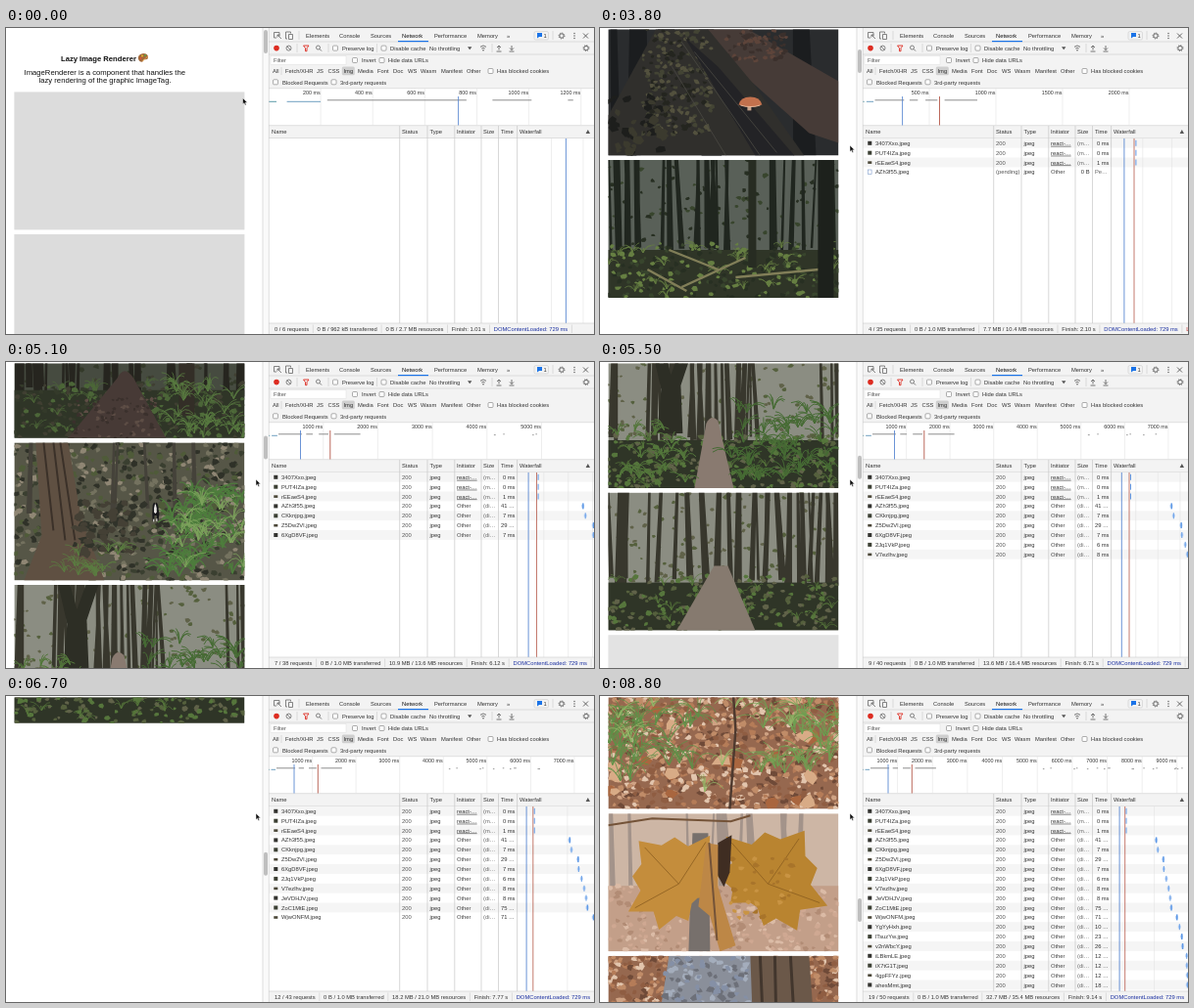
An HTML page for the animation above (8900 ms loop, 600 by 313 pixels).

```html
<!DOCTYPE html>
<html lang="en">
<head>
<meta charset="utf-8">
<title>Lazy Image Renderer</title>
<style>
html, body { margin: 0; width: 100%; height: 100%; overflow: hidden; background: #fff; }
svg { display: block; width: 100vw; height: 100vh; font: 5.8px "Liberation Sans", Arial, sans-serif; fill: #333; }
text { white-space: pre; }
</style>
</head>
<body>
<svg id="stage" viewBox="0 0 600 313" preserveAspectRatio="none"></svg>
<script>
const LOOP = 8900, STEP = 100, PITCH = 145.6, IW = 235, IH = 141;
const DCL = 0.729, LOAD = 1.41;

// name, ms taken, start on the network clock, moment the row appears
const rows = `3407Xxo 0 1.5 .4
PUT4IZa 0 1.5 .4
rEEaeS4 1 1.5 .4
AZh3f55 41 5.16 3.65
CKknjpg 7 5.37 4.1
Z5Dw2Vl 29 6.04 4.7
6XgD8VF 7 6.113 4.8
2Jq1VkP 6 6.42 5.2
V7ezlhv 8 6.7 5.5
JeVDHJV 8 6.9 5.8
ZoC1MtE 75 7.015 5.95
WjwONFM 71 7.7 6.45
YgYyHxh 10 8.03 6.9
lTsuzYw 23 8.3 7.65
v2nWbcY 26 8.4 7.7
iLBkmLE 12 8.92 7.9
iX7tG1T 12 8.95 7.95
4gpFFYz 12 9 8
ahesMmt 18 9.122 8.05`.split('\n').map(line => {
  const [name, ms, start, at] = line.split(' ');
  return { name: name + '.jpeg', ms: +ms, start: +start, at: +at, end: +start + ms / 1000 };
});
const scrollKeys = [[2.75, 0], [3.8, 221.6], [5.1, 711], [6, 1251], [7.5, 2385], [8.8, 2420.4]];
// the scrollbar runs a little ahead of the painted page
const thumbKeys = [[2.75, 2], [3.8, 22], [5.1, 75.5], [6, 121], [7.5, 204], [8.8, 207]];
const sizeKeys = [[0, 0], [3, 7.7], [4, 7.7], [7, 10.9], [11, 16.34], [13, 20.1], [19, 32.7]];

const clamp = (v, a, b) => Math.min(b, Math.max(a, v));
function along(keys, x) {
  if (x <= keys[0][0]) return keys[0][1];
  for (let i = 1; i < keys.length; i++) {
    const [x0, y0] = keys[i - 1], [x1, y1] = keys[i];
    if (x <= x1) return y0 + (y1 - y0) * (x - x0) / (x1 - x0);
  }
  return keys[keys.length - 1][1];
}

// drawing helpers
const n1 = v => v.toFixed(1);
const rect = (x, y, w, h, fill, more = '') => `<rect x="${x}" y="${y}" width="${w}" height="${h}" fill="${fill}" ${more}/>`;
const path = (d, fill, more = '') => `<path d="${d}" fill="${fill}" ${more}/>`;
const line = (d, stroke, w = 0.6, more = '') => path(d, 'none', `stroke="${stroke}" stroke-width="${w}" ${more}`);
const text = (x, y, s, more = '') => `<text x="${x}" y="${y}" ${more}>${s}</text>`;
const vline = (x, y0, y1, col, w) => line(`M${n1(x)} ${y0}V${y1}`, col, w);
const oval = (x, y, rx, ry, fill) => `<ellipse cx="${x}" cy="${y}" rx="${rx}" ry="${ry}" fill="${fill}"/>`;

// photo stand-ins
let seed = 1;
const rnd = (a, b) => a + (b - a) * (seed = seed * 16807 % 2147483647) / 2147483647;
const fillAll = c => rect(0, 0, IW, IH, c);

function blobs(n, [x, y, w, h], r, cols) {
  return cols.split(' ').map(c => {
    let d = '';
    for (let i = 0; i < n; i++) {
      const cx = rnd(x, x + w), cy = rnd(y, y + h), s = rnd(r * 0.5, r), turn = rnd(0, 6);
      for (let k = 0; k < 6; k++) {
        const a = turn + k * 1.047, q = s * rnd(0.5, 1.2);
        d += (k ? 'L' : 'M') + n1(cx + q * Math.cos(a)) + ' ' + n1(cy + q * Math.sin(a) * 0.8);
      }
      d += 'Z';
    }
    return path(d, c);
  }).join('');
}
function fronds(n, [x, y, w, h], len, col, sw = 0.8) {
  let d = '';
  for (let i = 0; i < n; i++) {
    const cx = rnd(x, x + w), cy = rnd(y, y + h);
    for (let k = 0; k < 6; k++) {
      const dx = rnd(-len, len);
      d += `M${n1(cx)} ${n1(cy)}q${n1(dx * 0.4)} ${n1(-len * 0.7)} ${n1(dx)} ${n1(-rnd(0.1, 0.8) * len)}`;
    }
  }
  return line(d, col, sw);
}
function trunks(n, col, wMax, base) {
  let d = '';
  for (let i = 0; i < n; i++) {
    const x = rnd(0, IW), w = rnd(wMax * 0.3, wMax), lean = rnd(-5, 5);
    d += `M${n1(x + lean)} 0h${n1(w * 0.7)}L${n1(x + w)} ${n1(base + rnd(-8, 12))}h${n1(-w)}Z`;
  }
  return path(d, col);
}
function maple(x, y, r, turn, col) {
  const half = [1, 0.72, 0.8, 0.66, 0.98, 0.64, 0.85, 0.55, 0.65, 0.4];
  const all = half.concat(half.slice(1).reverse());
  const at = (q, i) => {
    const a = turn + i * Math.PI * 2 / all.length;
    return n1(x + r * q * Math.sin(a)) + ' ' + n1(y - r * q * Math.cos(a));
  };
  return path('M' + all.map(at).join('L') + 'Z', col) +
    line([0, 4, 15].map(i => `M${x} ${y}L${at(0.85, i)}`).join(''), '#8b5d20', 0.8);
}
const all = [0, 0, IW, IH], low = [0, 85, IW, 56];
const woods = (sky, bark, leaf, fern) => fillAll(sky) + blobs(60, [0, 0, IW, 90], 3.5, leaf) + trunks(30, bark, 8, 95) +
  rect(0, 92, IW, 49, '#2f3527') + blobs(80, low, 4, leaf + ' ' + fern) + fronds(26, low, 12, fern, 0.7);
const litter = () => fillAll('#96684f') + blobs(190, all, 4.5, '#cfa283 #b57c58 #6f4a38 #e2c5ad #c08c68 #8f5d42');
const dog = (x, y, s) => `<g transform="translate(${x} ${y}) scale(${s})">` +
  path('M-6 -18l3 -6 3 3 3 -3 3 6 1 8 2 12 -2 16h-3l-1 -12h-5l-1 13h-3l-1 -16z', '#17171a') +
  path('M-1 -20h2l2 9v9l-3 4 -3 -4v-9z', '#e8e6e3') + rect(-5, 14, 2.5, 6, '#e8e6e3') + rect(2, 13, 2.5, 6, '#e8e6e3') + '</g>';

const mainWoods = () => woods('#596058', '#20261f', '#38452d #272f22', '#667f42');
const ferny = () => woods('#8b8d82', '#38372d', '#55603d #606249', '#56763c');
const leafPath = () => litter() + path('M90 0H125L135 141H80Z', '#766b62');
const scenes = [
  () => fillAll('#2b2d31') + blobs(120, all, 7, '#6e7080 #4a4c58 #1e2023 #868798') +
    blobs(55, [5, 5, 110, 85], 7, '#935d45 #74483a') + blobs(25, [125, 0, 85, 60], 5, '#7c5546') +
    blobs(25, [0, 0, 45, 30], 6, '#3f5f36') + blobs(25, [180, 0, 55, 35], 8, '#345a2e') +
    blobs(25, [185, 85, 50, 50], 8, '#3c6a34') + blobs(22, [0, 95, 40, 46], 8, '#39612f') +
    oval(120, 70, 33, 32, '#4d7c33') + blobs(50, [95, 45, 50, 50], 7, '#6f9f45 #578a38 #3e6b2b') +
    line('M160 84L235 92M180 86l25 -14M190 88l30 18M155 92l45 32M205 89l22 -18', '#c3c4d0', 0.9),
  () => fillAll('#2a2c2e') + trunks(7, '#1b1d1f', 24, 141) +
    path('M95 5L122 0 235 65V128L205 118 140 60Z', '#463b37') + blobs(35, [120, 12, 65, 32], 4, '#5d443a #3b302c') +
    path('M55 0H92L150 70 200 141H0V100Z', '#302f2c') + blobs(75, [35, 10, 70, 110], 4, '#434434 #24251f #53513e') +
    path('M78 20L112 50 190 141H150Z', '#232326') + line('M75 25L155 141M88 35L172 138M65 50L120 141', '#4b4a43', 0.8) +
    blobs(22, [0, 80, 60, 60], 7, '#1d1e1c #3b3a2e') + rect(142, 88, 4, 7, '#c9a48c') +
    path('M133 89q2 -8 12 -8t12 8q-12 4 -24 0z', '#c2714d') + path('M135 89q10 3 20 0v1q-10 3 -20 0z', '#e8b798'),
  () => mainWoods() + line('M62 92L112 112M75 130L140 100M130 120l85 -8M40 112l40 22', '#817e58', 2.4) +
    rect(214, 0, 16, 141, '#1d211c') + rect(143, 0, 8, 110, '#272c22'),
  () => mainWoods() + path('M80 141L112 88h16L150 141Z', '#5c5146'),
  () => woods('#464b40', '#26251f', '#343a2a #403f32', '#4c6638') + path('M55 141L105 80Q112 65 122 80L155 141Z', '#473a36') +
    blobs(45, [60, 100, 85, 41], 3, '#5d4d45 #3a302c') + rect(168, 0, 16, 118, '#332e27') + fronds(28, [160, 85, 75, 56], 18, '#587a40'),
  () => fillAll('#565647') + blobs(140, all, 4.5, '#74725f #3a3f30 #4f5b39 #8f8674 #2f3128') + trunks(6, '#45423a', 6, 70) +
    path('M22 0H55L68 75 92 141H10L28 95Z', '#5f5042') + line('M30 0L40 90M40 0L52 100M47 0L62 100', '#3b3129', 2) +
    blobs(50, [60, 60, 75, 55], 6, '#31332a #444035') + fronds(40, [150, 55, 85, 85], 26, '#4d7c3c', 1.1) +
    fronds(20, [165, 60, 70, 70], 22, '#7da35c') + fronds(14, [45, 110, 70, 30], 16, '#5b7d40') + dog(144, 72, 0.45),
  () => ferny() + path('M45 0H57L64 25 73 0H86L74 36 76 85H50L54 40Z', '#2d2e25') +
    path('M88 141L100 75Q105 65 112 72L128 141Z', '#897a70') + fronds(45, [125, 60, 110, 80], 20, '#466b34', 1) + fronds(22, [0, 80, 80, 55], 16, '#53763b', 1),
  () => ferny() + path('M70 141L108 75h14L150 141Z', '#867a6f'),
  () => fillAll('#4b4540') + blobs(55, [0, 0, IW, 45], 5, '#a9a78d #6d6f50 #8b8a78') + trunks(12, '#37332c', 6, 38) +
    path('M0 80L60 45H180L235 90V141H0Z', '#48423f') + blobs(90, [0, 50, IW, 91], 4, '#37322f #5f5751 #2c2927') +
    fronds(30, [0, 100, 60, 40], 12, '#596945') + fronds(25, [190, 75, 45, 66], 12, '#626f47') +
    path('M190 0H215L213 80H196Z', '#29241f') + rect(112, 0, 16, 52, '#342d26') + dog(155, 84, 1),
  ferny,
  () => woods('#8f9082', '#3c392f', '#65623f #6a6347', '#627541'),
  ferny,
  () => litter() + trunks(5, '#5c5048', 14, 80),
  () => litter() + fronds(18, all, 20, '#6f8c46'),
  leafPath,
  () => litter() + trunks(4, '#66594f', 12, 70),
  () => litter() + blobs(14, all, 11, '#a9663f #d8ab86') + fronds(30, [0, 40, 95, 75], 32, '#5f9148') +
    fronds(24, [155, 35, 80, 70], 32, '#6fa052') + fronds(12, all, 24, '#93b768') + line('M126 0L130 60 124 141', '#4f3a2f', 2.5),
  () => fillAll('#cdb6a5') + trunks(12, '#a3938a', 9, 75) + rect(0, 74, IW, 67, '#c39f89') + blobs(90, [0, 74, IW, 67], 4, '#dbbba6 #b28c75 #cfa892') +
    path('M86 20H102L104 141H82Z', '#77706c') + maple(72, 72, 60, -0.75, '#c48d3c') + maple(163, 72, 66, 0.6, '#b98430') +
    blobs(16, [125, 45, 65, 65], 4, '#a8742a #c99443') + path('M112 30L126 22 124 60 118 75 110 60Z', '#3f2d22') +
    path('M100 30L112 32 112 75 130 135 114 141 104 105 92 95Z', '#bd8746') +
    line('M103 30L111 130M0 12L45 5 125 8 145 2', '#745338', 2),
  () => litter() + path('M62 0H150L155 141H40Z', '#8a8f9a') + blobs(90, [58, 0, 85, 141], 5, '#a4adbc #6d7079 #8590a6') +
    path('M145 0H205L215 141H150Z', '#6b5849') + line('M155 0l6 141M170 0l3 141M186 0l8 141', '#42362d', 3)
];

// static browser chrome
const box = (x, y) => rect(x - 2.5, y - 2.5, 5, 5, '#fff', 'rx="1" stroke="#777" stroke-width=".6"');
const words = (y, list) => list.split('|').map(s => { const i = s.indexOf(' '); return text(s.slice(0, i), y, s.slice(i + 1)); }).join('');
const sep = (x, y0, y1) => vline(x, y0, y1, '#ccc', 0.6);
const gear = (x, y) => `<circle cx="${x}" cy="${y}" r="2.2" fill="none" stroke="#666" stroke-width="1"/>` +
  `<circle cx="${x}" cy="${y}" r="3" fill="none" stroke="#666" stroke-width=".9" stroke-dasharray="1.1 1.26"/>`;
const arrow = (x, up) => line(`M${x} 22.5v-4.5m-2 ${up ? 2 : 2.5}l2 ${up ? -2 : 2} 2 ${up ? 2 : -2}M${x - 2.5} 24h5`, '#555', 0.8);

function chrome() {
  let s = rect(268, 0, 332, 62, '#f3f3f3') + rect(268, 61.5, 332, 38, '#fff') + rect(268, 99.5, 332, 213.5, '#fff') +
    rect(268, 99.8, 332, 12.6, '#f3f3f3');
  for (const y of [14, 27, 61.7, 99.7, 112.5]) s += line(`M268 ${y}H600`, '#ccc');
  s += line('M279 8.5v-4h-5.5v5.5h2.5M277 7l4 4m-4 -1.5v-2.5h2.5', '#666', 0.8) +
    line('M287 11h-1.5v-7h5v1.5M288.5 6.5h4v5h-4z', '#666', 0.8) + sep(299, 3, 12) +
    words(10, '306 Elements|340 Console|372 Sources|437 Performance|481 Memory|511 »') +
    text(404, 10, 'Network', 'fill="#111"') + rect(400, 13, 31, 1.2, '#1a73e8') +
    path('M542 5h5v4h-3l-2 1.6z', '#1a73e8') + text(548.5, 10, '1') + rect(539, 3.6, 14.5, 8.4, 'none', 'rx="1.5" stroke="#ccc" stroke-width=".6"') +
    sep(558, 3, 12) + gear(567, 8) + [5.5, 8, 10.5].map(y => oval(580, y, 0.7, 0.7, '#555')).join('') + line('M589 5.5l5 5m0 -5l-5 5', '#555', 0.9);
  s += oval(276, 20.6, 2.8, 2.8, '#dd2c21') + '<circle cx="288.5" cy="20.6" r="2.5" fill="none" stroke="#666" stroke-width=".8"/>' +
    line('M286.8 18.9l3.4 3.4', '#666', 0.8) + sep(297, 16, 25) + line('M303.5 18h5.5l-2 2.7v3h-1.5v-3z', '#dd2c21', 0.9) +
    '<circle cx="318.5" cy="20" r="2" fill="none" stroke="#666" stroke-width=".8"/>' + line('M320 21.5l2 2', '#666', 0.9) + sep(329, 16, 25) +
    box(336, 20.6) + box(385.5, 20.6) + words(22.6, '343 Preserve log|392 Disable cache|432 No throttling') + sep(378.5, 16, 25) +
    path('M471 19.3h4.4l-2.2 3z', '#555') + line('M484 19.3q3 -2.6 6 0M485.3 21q1.7 -1.4 3.4 0', '#555', 0.8) + oval(487, 22.8, 0.8, 0.8, '#555') +
    sep(496, 16, 25) + arrow(503, true) + arrow(516, false) + gear(592, 20.6);
  s += rect(270, 28.6, 77, 9, '#fff', 'stroke="#ddd" stroke-width=".5"') + text(273, 35.3, 'Filter', 'fill="#555"') + box(356, 33) + box(383.5, 33) +
    words(35.2, '363 Invert|390 Hide data URLs') + rect(342.8, 39.6, 13, 8.6, '#cfcfcf', 'rx="1.5"') + sep(281, 40, 48) +
    words(46.2, '272 All|285 Fetch/XHR|317 JS|328.5 CSS|344.5 Img|359 Media|379 Font|395 Doc|410 WS|423 Wasm|444 Manifest|470 Other|501 Has blocked cookies') +
    box(494.5, 44) + box(275, 55.3) + box(334.5, 55.3) + words(57.5, '282 Blocked Requests|341 3rd-party requests') +
    words(108.3, '271 Name|404 Status|432.5 Type|460 Initiator|487 Size|505 Time|524 Waterfall') + path('M591.6 108h4.4l-2.2 -4z', '#555');
  return s;
}
const palette = path('M135 32q-1 -5 5 -6 5 0 5 4 0 3 -4 2 -1 0 -1 2 -3 2 -5 -2z', '#a3693a') +
  oval(137.5, 31, 0.9, 0.9, '#e34d3c') + oval(139, 28.5, 0.9, 0.9, '#f2c230') + oval(142, 28, 0.9, 0.9, '#58a846') + line('M139 34l6 -5', '#d99c4e', 1);

const $ = id => document.getElementById(id);
$('stage').innerHTML = `<defs><clipPath id="page"><rect y="1.5" width="262" height="312"/></clipPath>
<clipPath id="photo"><rect width="${IW}" height="${IH}"/></clipPath></defs>` +
  rect(0, 0, 600, 313, '#fff') + '<g clip-path="url(#page)"><g id="scroll" fill="#111">' +
  text(56, 33.5, 'Lazy Image Renderer', 'font-size="7.65" font-weight="700"') + palette +
  text(18.5, 47.8, 'ImageRenderer is a component that handles the', 'font-size="7.7"') +
  text(33.5, 55.8, 'lazy rendering of the graphic ImageTag.', 'font-size="7.7"') +
  scenes.map((draw, i) => {
    seed = 977 + i * 613;
    return `<g transform="translate(8.4 ${n1(65.4 + i * PITCH)})">${rect(0, 0, IW, IH, '#dcdcdc', `id="hold${i}"`)}` +
      `<g id="img${i}" clip-path="url(#photo)">${draw()}</g></g>`;
  }).join('') + '</g></g>' +
  rect(261.8, 0, 6.2, 313, '#fafafa') + sep(262, 0, 313) + rect(263, 0, 4, 24, '#bfbfbf', 'id="thumb" rx="2"') +
  chrome() + '<g id="over"></g><g id="table"></g><g id="foot"></g>' + sep(268.3, 0, 313) +
  '<path id="cursor" d="M0 0v6.6l1.5 -1.4 1 2.4 1.2 -.5 -1 -2.3h2.1z" fill="#111" stroke="#fff" stroke-width=".5"/>';

const BLUE = '#5b88d2', RED = '#b5584a';
const niceStep = (scale, min, list) => list.find(v => v * scale >= min) || list[list.length - 1];
// the overview widens by a quarter whenever it runs out of room
const overviewScale = end => 332 / Math.pow(1.25, Math.ceil(Math.log(end) / Math.log(1.25) - 1e-6));

function overview(end, labelEnd) {
  const k = overviewScale(end), X = v => 268 + v * k;
  const labelK = overviewScale(labelEnd), step = niceStep(labelK, 35, [0.1, 0.2, 0.5, 1]);
  let s = '';
  for (let i = 1, x; (x = 268 + i * step * labelK) < 600; i++)
    s += vline(x, 62, 99.5, '#e2e2e2', 0.6) + text(n1(x - 0.5), 67.6, Math.round(i * step * 1000) + ' ms', 'text-anchor="end" font-size="5.4"');
  for (const [a, b, y, col] of [[0, 0.03, 75.3, '#5b9aa8'], [0.07, 0.2, 75.3, '#6f9fc0'], [0.225, 0.76, 73.8, '#8d8d8d'],
    [0.86, 1.01, 73.8, '#8d8d8d'], [1.15, 1.37, 73.8, '#8d8d8d'], [1.5, 2.1, 73.8, '#8d8d8d']])
    if (a < end) s += line(`M${n1(X(a))} ${y}H${n1(X(Math.min(b, end)))}`, col, 1);
  rows.slice(3).forEach((r, i) => {
    if (r.end <= end + 0.001) s += line(`M${n1(X(r.start))} ${i % 2 ? 73.8 : 74.6}h${n1(Math.max(1.5, r.ms / 1000 * k))}`, '#8d8d8d', 0.9);
  });
  s += vline(X(DCL), 70, 99.5, BLUE, 0.9);
  return end > LOAD ? s + vline(X(LOAD), 70, 99.5, RED, 0.9) : s;
}

const waiting = (r, t) => r === rows[3] && t < r.start - 1.25;

function table(t, shown, end) {
  const k = 76 / end, X = v => 524 + v * k, step = niceStep(k, 20, [0.2, 0.5, 1, 2, 5]);
  let s = '', bars = '';
  shown.forEach((r, i) => {
    const y = 112.8 + i * 9.87, b = n1(y + 7), wait = waiting(r, t), local = i < 3;
    if (i % 2 === 0) s += rect(268.5, n1(y), 331.5, 9.87, '#f5f5f5');
    s += wait ? rect(273.5, n1(y + 2.6), 3.6, 4.6, '#fff', 'stroke="#7f9ccb" stroke-width=".6"')
      : rect(273.3, n1(y + (i % 3 === 2 ? 3.8 : 3)), 4, i % 3 === 2 ? 2.6 : 4, ['#33332f', '#3c4034', '#4a4637'][i % 3]);
    const cell = (x, str, more) => text(x, b, str, more);
    s += cell(281, r.name) + cell(404, wait ? '(pending)' : 200, 'fill="#555"') + cell(432.5, 'jpeg') +
      cell(460, local ? 'react-…' : 'Other', local ? 'text-decoration="underline"' : 'fill="#444"') +
      (wait ? cell(499.5, '0 B', 'text-anchor="end"') : cell(487, local ? '(m…' : '(di…', 'fill="#666"')) +
      (wait ? cell(505, 'Pe…', 'fill="#666"') : r.ms > 9 ? cell(505, r.ms + ' …') : cell(519.5, r.ms + ' ms', 'text-anchor="end"'));
    if (!wait) {
      const x = Math.min(X(r.start), 598.8);
      bars += (local ? '' : rect(n1(x - 1), n1(y + 3.4), 3, 3, '#bcd4f6')) + rect(n1(x), n1(y + 2), r.ms > 20 ? 1.5 : 1, 6, '#5f99e6');
    }
  });
  for (const x of [401.7, 430, 457.8, 485, 502.5, 521.6]) s += vline(x, 100, 302, '#c8c8c8', 0.7);
  for (let i = 1; X(i * step) < 600; i++) s += vline(X(i * step), 113, 302, '#e2e2e2', 0.6);
  s += vline(X(DCL), 113, 302, BLUE, 0.9);
  if (end > LOAD) s += vline(X(LOAD), 113, 302, RED, 0.8);
  return s + bars;
}

function footer(t, n, finish) {
  const mb = along(sizeKeys, n), total = n > 2 ? n + 31 : 6;
  const parts = [`${n} / ${total} requests`, `0 B / ${t < 0.3 ? '962 kB' : '1.0 MB'} transferred`,
    `${n ? mb.toFixed(1) + ' MB' : '0 B'} / ${(mb + 2.74).toFixed(1)} MB resources`, `Finish: ${finish.toFixed(2)} s`, 'DOMContentLoaded: 729 ms'];
  if (finish > LOAD) parts.push('Load: 1.41 s');
  const foot = $('foot');
  foot.innerHTML = rect(268, 302, 332, 11, '#f3f3f3') + line('M268 302H600', '#ccc') +
    parts.map((p, i) => text(0, 310.3, p, i > 3 ? `fill="${i > 4 ? '#c5221f' : '#1a2fa0'}"` : '')).join('');
  let x = 274, seps = '';
  for (const el of foot.querySelectorAll('text')) {
    el.setAttribute('x', n1(x));
    x += el.getComputedTextLength() + 8.5;
    seps += sep(x - 4.3, 303.5, 312);
  }
  foot.insertAdjacentHTML('beforeend', seps);
}

function network(t) {
  const shown = rows.filter(r => t >= r.at), done = shown.filter(r => !waiting(r, t));
  const finish = Math.max(Math.min(2.1, 1.01 + Math.max(0, t) * 1.15), ...done.map(r => r.end));
  const end = done.length < shown.length ? t + 1.3 : Math.max(finish, 1.17);
  return { shown, finish, end };
}

function render(t) {
  const { shown, finish, end } = network(t);
  $('scroll').setAttribute('transform', `translate(0 ${n1(-along(scrollKeys, t))})`);
  $('thumb').setAttribute('y', n1(along(thumbKeys, t)));
  scenes.forEach((_, i) => {
    const at = rows[i].at, ready = t >= at + 0.25;
    const hold = i < 3 ? 1 : clamp((at + 0.13 - t) / 0.1, 0, 1) * (t >= at - 0.11 ? 0.8 : 0);
    $('img' + i).setAttribute('display', ready ? 'inline' : 'none');
    $('hold' + i).setAttribute('opacity', hold);
  });
  const move = clamp((t - 2.2) / 0.5, 0, 1);
  $('cursor').setAttribute('transform', `translate(${n1(241.5 + 13.5 * move)} ${n1(71.5 + 48.5 * move)})`);
  // labels catch up with the scale a moment later
  $('over').innerHTML = overview(end, network(t - 0.4).end);
  $('table').innerHTML = table(t, shown, end);
  footer(t, shown.length, finish);
}

let last = -1;
const begin = performance.now();
function tick() {
  const step = Math.floor((performance.now() - begin) % LOOP / STEP);
  if (step !== last) render((last = step) * STEP / 1000);
  requestAnimationFrame(tick);
}
tick();
</script>
</body>
</html>
```
